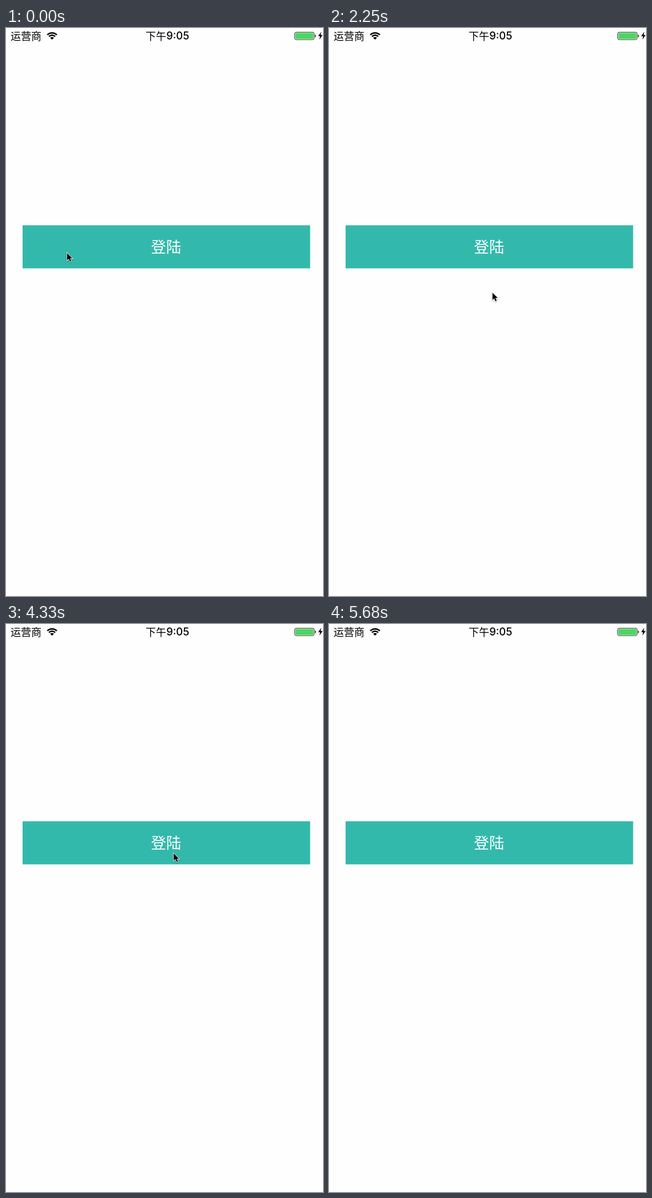
An HTML page for the animation above (5820 ms loop, 554 by 989 pixels).

```html
<!DOCTYPE html>
<html lang="zh-CN">
<head>
<meta charset="utf-8">
<title>Ripple button</title>
<style>
  html, body { margin: 0; height: 100%; overflow: hidden; background: #fefefe; }
  svg { display: block; width: 100%; height: 100%; }
  text { font: 300 18px "Noto Sans CJK SC", "Noto Sans CJK", sans-serif; }
  .time { font-weight: 500; }
  .digits { font: 500 18.3px Inter, sans-serif; }
  .label { font-size: 26.5px; fill: #fff; text-anchor: middle; }
  .button { clip-path: url(#bounds); isolation: isolate; opacity: .999; }
  #cursor { filter: drop-shadow(0 1px 1px rgba(0, 0, 0, .35)); }
</style>
</head>
<body>
<svg viewBox="0 0 554 989">
  <clipPath id="bounds"><rect x="29" y="343.5" width="502.5" height="75"/></clipPath>

  <text x="8" y="20.5">运营商</text>
  <g fill="none" stroke="#000" stroke-width="2.5">
    <path d="M72.2 11.9A11.7 11.7 0 0 1 88.8 11.9"/>
    <path d="M75.1 14.8A7.6 7.6 0 0 1 85.9 14.8"/>
    <path d="M80.5 20.3L77.2 17A4.7 4.7 0 0 1 83.8 17Z" fill="#000" stroke="none"/>
  </g>
  <text class="time" x="244" y="20.5">下午</text>
  <text class="digits" x="280.3" y="20.3">9:05</text>
  <rect x="504.5" y="7.3" width="34" height="13" rx="2.5" fill="#fff" stroke="#000" stroke-width=".8"/>
  <rect x="505.7" y="8.5" width="31.6" height="10.6" rx="1.3" fill="#4bd763"/>
  <path d="M540 11.2Q541.6 12 541.6 13.8T540 16.5Z"/>
  <path d="M551 6.5L545.5 14.3H549L547.7 20.3 553.3 12.3H549.8Z"/>

  <g class="button">
    <rect x="20" y="335" width="520" height="92" fill="#33b9ab"/>
    <circle id="ripple" fill="#b580ca"/>
  </g>
  <text class="label" x="279.7" y="391">登陆</text>
  <path id="cursor" d="M.7 1V13.5L3.7 10.8 5.9 15.7 8 14.8 5.9 10.1H9.9Z"
        stroke="#fff" stroke-width="1.6" paint-order="stroke"/>
</svg>
<script>
// Time is counted in steps: the picture advances 39 times per loop.
const LOOP = 5820, STEPS = 39;
const SPEED = 56.4, LIFE = 6.7; // ripple growth per step, and steps it lasts

// Stops of the pointer; a tap starts a ripple where the pointer is.
const stops = [
  { at: 0, x: 106, y: 391 },
  { at: 1, x: 95, y: 391 },
  { at: 3, x: 95, y: 391 },
  { at: 6, x: 79, y: 391 },
  { at: 7.906, x: 79, y: 392, tap: true },
  { at: 11, x: 199, y: 416 },
  { at: 15, x: 285, y: 460 },
  { at: 19.72, x: 444.8, y: 373, tap: true },
  { at: 22, x: 371, y: 553 },
  { at: 26, x: 306, y: 427 },
  { at: 30.54, x: 285.5, y: 384, tap: true },
  { at: 32, x: 494, y: 857 },
  { at: 33, x: 525, y: 965 }
];

const ripple = document.getElementById("ripple");
const cursor = document.getElementById("cursor");

function set(el, attrs) {
  for (const name in attrs) el.setAttribute(name, attrs[name]);
}

function drawRipple(step) {
  const tap = stops.find(s => s.tap && step >= s.at && step < s.at + LIFE);
  set(ripple, tap ? { cx: tap.x, cy: tap.y, r: (step - tap.at) * SPEED } : { r: 0 });
}

function drawCursor(step) {
  const next = stops.findIndex(s => s.at >= step);
  set(cursor, { visibility: next < 0 ? "hidden" : "visible" });
  if (next < 0) return;
  const b = stops[next], a = stops[next - 1] || b;
  const f = (step - a.at) / (b.at - a.at || 1);
  const mix = key => a[key] + (b[key] - a[key]) * f;
  set(cursor, { transform: `translate(${mix("x")} ${mix("y")})` });
}

const origin = performance.now();
function tick() {
  const time = (performance.now() - origin) % LOOP;
  const step = Math.floor(time * STEPS / LOOP);
  drawRipple(step);
  drawCursor(step);
  requestAnimationFrame(tick);
}
tick();
</script>
</body>
</html>
```
